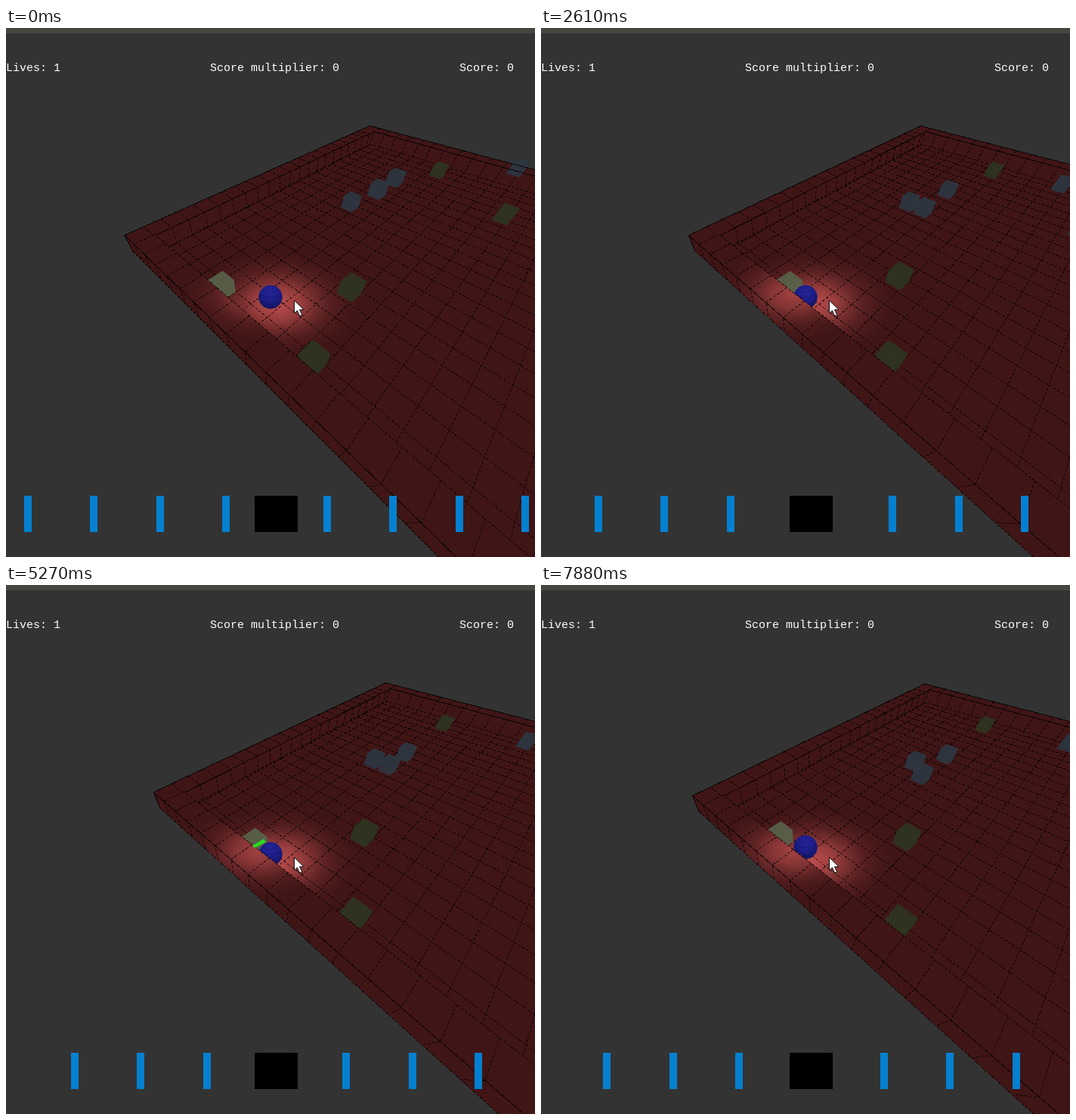
Write an HTML page that moves like this. It is 700x700 px and loops after 8000 ms.

```html
<!DOCTYPE html>
<html lang="en">
<head>
<meta charset="utf-8">
<title>Ball arena</title>
<style>
html, body { margin: 0; width: 100%; height: 100%; overflow: hidden; background: #333; }
svg { display: block; width: 100vw; height: 100vh; }
text { font: 15px "Liberation Mono", "DejaVu Sans Mono", monospace; fill: #fff; white-space: pre; }
.line { fill: none; stroke: #000; stroke-width: 1; shape-rendering: crispEdges; }
.dash { stroke-dasharray: 4 2; opacity: .72; }
</style>
</head>
<body>
<svg viewBox="0 0 700 700">
  <defs>
    <radialGradient id="light">
      <stop offset="0" stop-color="#c45050" stop-opacity=".95"/>
      <stop offset=".3" stop-color="#b84c4c" stop-opacity=".72"/>
      <stop offset=".65" stop-color="#963c3c" stop-opacity=".25"/>
      <stop offset="1" stop-color="#702828" stop-opacity="0"/>
    </radialGradient>
    <radialGradient id="skin" cx=".5" cy=".3" r=".7">
      <stop offset="0" stop-color="#25259a"/>
      <stop offset=".5" stop-color="#1d1d88"/>
      <stop offset="1" stop-color="#131360"/>
    </radialGradient>
    <clipPath id="inBase"><path id="baseClip"/></clipPath>
    <clipPath id="inRim"><path id="rimClip"/></clipPath>
  </defs>
  <rect width="700" height="700" fill="#333"/>
  <path id="base" fill="#401516"/>
  <g clip-path="url(#inBase)"><ellipse cx="359" cy="365" rx="108" ry="70" fill="url(#light)"/></g>
  <path id="grid" class="line dash"/>
  <g id="cubes"></g>
  <g id="ball">
    <circle r="15.7" fill="url(#skin)"/>
    <path d="M-9-9Q0-4 9-9M-14-3Q0 4 14-3" fill="none" stroke="#10105c" stroke-opacity=".45"/>
  </g>
  <path id="rim" fill="#401516"/>
  <g clip-path="url(#inRim)"><ellipse cx="335" cy="351" rx="100" ry="64" fill="url(#light)" opacity=".8"/></g>
  <path id="ticks" class="line dash"/>
  <path id="edges" class="line" opacity=".85"/>
  <path id="spark" d="M326 345L341 336 344 340 329 348Z" fill="#2bdc20"/>
  <rect width="700" height="7" fill="#45463f"/>
  <text x="0" y="57">Lives: 1</text>
  <text x="270" y="57">Score multiplier: 0</text>
  <text x="600" y="57">Score: 0</text>
  <path id="bars" fill="#0480d0"/>
  <rect x="329" y="619" width="57" height="48"/>
  <path d="M381.5 360.5v17l4-3.6 3.2 7.2 3-1.3-3.2-7h5.6z" fill="#fff" stroke="#111"/>
</svg>
<script>
const $ = id => document.getElementById(id);
const LOOP = 8000, SIZE = 22.9, RIM = 1.1, CUBE = 0.78;
const TOP = 7.8, FLOOR = 8.8;                 // depths below the camera
const F = 342, SIN = 0.756, COS = 0.6545;     // focal length and pitch
const BEAT = 14.28, BEAT_SHIFT = 3.4;         // in game ticks
const clamp = (v, a = 0, b = 1) => Math.min(b, Math.max(a, v));
const arc = k => Math.sin(Math.PI * clamp(k));

// The game runs in ticks, at a slightly uneven pace: [ms, tick]
const PACE = [[0, 0], [840, 9], [2610, 22], [5270, 53], [6490, 68], [7880, 81]];
function tickAt(t) {
  let n = 0;
  for (let i = 1; i < PACE.length; i++) {
    const [a, from] = PACE[i - 1], [b, to] = PACE[i];
    n += (to - from) * clamp((t - a) / (b - a));
  }
  return Math.floor(n + 0.2);
}

// Left corner of the arena as seen from the camera, which follows the ball
const corner = n => [
  2.32 + 0.0673 * Math.min(n, 15),
  12.52 - 0.128 * (clamp(n - 14, 0, 8) + clamp(n - 78, 0, 3))
];

function project(p, q, h) {
  const g = (p + q) / Math.SQRT2, l = (p - q) / Math.SQRT2, z = g * COS + h * SIN;
  return [350 + F * l / z, 350 + F * (h * COS - g * SIN) / z];
}
const path = pts => "M" + pts.map(p => p[0].toFixed(1) + " " + p[1].toFixed(1)).join("L");
const shape = (...pts) => path(pts.map(v => project(...v)));

function hull(pts) {
  pts.sort((a, b) => a[0] - b[0] || a[1] - b[1]);
  const half = list => {
    const out = [];
    for (const c of list) {
      while (out.length > 1) {
        const [a, b] = out.slice(-2);
        if ((b[0] - a[0]) * (c[1] - a[1]) > (b[1] - a[1]) * (c[0] - a[0])) break;
        out.pop();
      }
      out.push(c);
    }
    return out.slice(0, -1);
  };
  return [...half(pts), ...half([...pts].reverse())];
}

// Each cube has a place on the floor and steps of one cell: [beat, along, across]
const GREEN = "#2d3520", BLUE = "#2c3742", LIT = "#58624a";
const CUBES = [
  { fill: LIT, at: [1.6, 5.6], steps: [[5, 0, -1]] },
  { fill: GREEN, at: [5.55, 9.66], steps: [[1, 0, -1]] },
  { fill: GREEN, at: [1.7, 10.62], steps: [[2, 0, 1], [3, 0, -1]] },
  { fill: GREEN, at: [19.83, 7.73], steps: [[3, 0, -1]] },
  { fill: GREEN, at: [16.8, 12.8], steps: [[1, -1, 1], [2, 0, 1]] },
  { fill: BLUE, at: [11.6, 5.66], steps: [], grounded: true },
  { fill: BLUE, at: [12.65, 6.64], steps: [[1, -1, 0], [5, -1, 0]] },
  { fill: BLUE, at: [14.76, 6.66], steps: [[2, -1, 0]] },
  { fill: BLUE, at: [21.95, 11.77], steps: [[1, -1, 0]] }
];
for (const c of CUBES) {
  c.el = document.createElementNS("http://www.w3.org/2000/svg", "path");
  c.el.setAttribute("fill", c.fill);
  c.el.setAttribute("opacity", ".92");
  $("cubes").append(c.el);
}

function drawCubes(n, p0, q0) {
  const beat = (n + BEAT_SHIFT) / BEAT;
  // Blue cubes leap for one beat in four
  const leap = beat % 4 < 1 ? 1.15 * arc(beat % 4) : 0;
  for (const { el, fill, at, steps, grounded } of CUBES) {
    let [a, b] = at;
    for (const [when, da, db] of steps) {
      const k = clamp((beat - when) * 5);
      a += da * k;
      b += db * k;
    }
    const jumps = fill === BLUE && !(grounded && beat < 1);
    const h = FLOOR - (jumps ? leap : 0), r = CUBE / 2, pts = [];
    for (const i of [-r, r]) for (const j of [-r, r]) for (const up of [0, CUBE])
      pts.push(project(p0 + a + i, q0 - b + j, h - up));
    el.setAttribute("d", path(hull(pts)) + "Z");
  }
}

function drawArena(p0, q0) {
  const p1 = p0 + SIZE, q1 = q0 - SIZE;
  const a = p0 + RIM, b = p1 - RIM, c = q0 - RIM, d = q1 + RIM;
  const face = shape([p0, q0, TOP], [p0, q1, TOP], [p0, q1, FLOOR], [p0, q0, FLOOR]) + "Z";
  const top = shape([p0, q0, TOP], [p1, q0, TOP], [p1, q1, TOP], [p0, q1, TOP]) + "Z";
  const near = shape([p0, q0, TOP], [a, c, TOP], [a, d, TOP], [p0, q1, TOP]) + "Z";
  for (const id of ["base", "baseClip"]) $(id).setAttribute("d", top + face);
  for (const id of ["rim", "rimClip"]) $(id).setAttribute("d", near + face);

  let grid = shape([a, c, FLOOR], [b, c, FLOOR], [b, d, FLOOR]), ticks = "";
  for (let i = 1; i < SIZE - 1; i++) {
    const p = p0 + i, q = q0 - i;
    grid += shape([p, q0, TOP], [p, c, TOP], [p, c, FLOOR], [p, d, FLOOR]);
    grid += shape([p1, q, TOP], [b, q, TOP], [b, q, FLOOR], [a, q, FLOOR]);
    ticks += shape([a, q, TOP], [p0, q, TOP], [p0, q, FLOOR]);
  }
  $("grid").setAttribute("d", grid);
  $("ticks").setAttribute("d", ticks + shape([a, d, TOP], [a, c, TOP]) +
    shape([p0, q0, FLOOR], [p0, q1, FLOOR]));
  $("edges").setAttribute("d", shape([p0, q1, TOP], [p0, q0, TOP], [p1, q0, TOP], [p1, q1, TOP]) +
    shape([a, c, TOP], [b, c, TOP], [b, d, TOP]) + shape([p0, q0, TOP], [p0, q0, FLOOR]));
}

function drawBars(n) {
  const gap = 87.5;
  let d = "";
  for (let x = (24 + 6.125 * n) % gap; x < 340; x += gap)
    for (const left of [Math.floor(x), 706 - Math.floor(x)]) d += `M${left} 619h10v48h-10z`;
  $("bars").setAttribute("d", d);
}

function render(t) {
  const n = tickAt(t), [p0, q0] = corner(n);
  const y = 356 - 9 * arc(n / 18) - 3 * clamp(n - 78, 0, 3);
  drawArena(p0, q0);
  drawCubes(n, p0, q0);
  drawBars(n);
  $("ball").setAttribute("transform", `translate(350 ${y})`);
  $("spark").setAttribute("visibility", n > 22 && n <= 78 ? "visible" : "hidden");
}

const start = performance.now();
function loop() {
  render((performance.now() - start) % LOOP);
  requestAnimationFrame(loop);
}
render(0);
requestAnimationFrame(loop);
</script>
</body>
</html>
```
